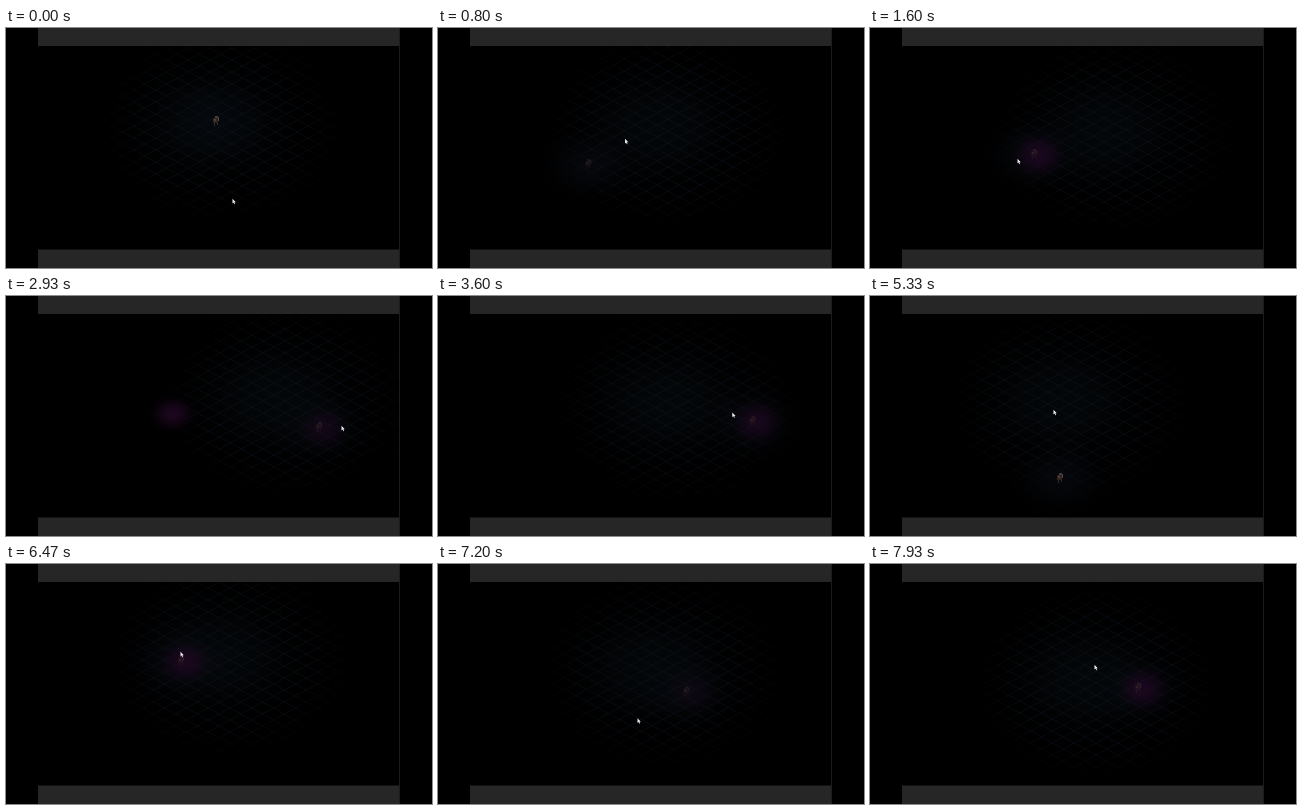
Animation of 426x240 px, one loop 8000 ms. Source, as an HTML page with a canvas:

```html
<!DOCTYPE html>
<html lang="en">
<head>
<meta charset="utf-8">
<title>Dark grid</title>
<style>
html, body { margin: 0; width: 100%; height: 100%; overflow: hidden; background: #000; }
canvas { display: block; width: 426px; height: 240px; }
</style>
</head>
<body>
<canvas id="stage" width="426" height="240"></canvas>
<script>
const ctx = document.getElementById('stage').getContext('2d');
const LOOP = 8000, STEP = LOOP / 120, FADE = 330, TRAIL = 130;

// Key poses; swing bends the pointer's way to the pose, lead is how early the hero lands.
const poses = [
  { t: 0, pointer: [226, 170], hero: [210, 93], light: [215, 98] },
  { t: 1600, pointer: [147, 130], hero: [164, 126], light: [245, 108], swing: [-60, -40], lead: 130 },
  { t: 2930, pointer: [335, 129], hero: [313, 131], light: [279, 105], swing: [118, -15], lead: 65 },
  { t: 4400, pointer: [240, 53], hero: [228, 126], light: [187, 120], swing: [0, 20], lead: 400 },
  { t: 5330, pointer: [183, 113], hero: [190, 182], light: [200, 108], swing: [0, 110], lead: 400 },
  { t: 6470, pointer: [174, 87], hero: [175, 97], light: [224, 96], swing: [-25, 0], lead: 130 },
  { t: 7930, pointer: [224, 100], hero: [268, 124], light: [226, 119], swing: [65, 60], lead: 130 }
];

const mix = (a, b, p) => a.map((v, i) => v + (b[i] - v) * p);

function segment(t) {
  const i = poses.findIndex(p => p.t > t);
  if (i < 0) return [poses.at(-1), poses.at(-1), 0];
  const a = poses[i - 1], b = poses[i], p = (t - a.t) / (b.t - a.t);
  return [a, b, p * p * (3 - 2 * p)];
}

function pointerAt(t) {
  const [a, b, p] = segment(t);
  const [x, y] = mix(a.pointer, b.pointer, p);
  if (!p) return [x, y];
  return [x + b.swing[0] * Math.sin(2 * Math.PI * p), y + b.swing[1] * Math.sin(Math.PI * p)];
}

function lightAt(t) {
  const [a, b, p] = segment(t);
  return mix(a.light, b.light, p);
}

// The hero chases the pointer twice on the way, then lands at the pose.
const hops = [{ t: -LOOP, at: poses[0].hero }];
poses.slice(1).forEach((pose, i) => {
  const from = poses[i].t, land = pose.t - pose.lead;
  for (const p of [0.3, 0.65]) {
    const t = from + (pose.t - from) * p;
    if (t < land) hops.push({ t, at: pointerAt(t) });
  }
  hops.push({ t: land, at: pose.hero });
});

function ellipse(x, y, rx, ry, rgb, alpha) {
  ctx.save();
  ctx.translate(x, y);
  ctx.scale(rx, ry);
  const g = ctx.createRadialGradient(0, 0, 0, 0, 0, 1);
  for (let p = 0; p <= 1; p += 0.25) {
    g.addColorStop(p, `rgba(${rgb},${alpha * (1 + Math.cos(Math.PI * p)) / 2})`);
  }
  ctx.fillStyle = g;
  ctx.fillRect(-1, -1, 2, 2);
  ctx.restore();
}

function gridLines(x, y, r, alpha) {
  ctx.save();
  ctx.translate(x, y);
  ctx.beginPath();
  for (let c = -180; c <= 180; c += 12) {
    for (const s of [-0.55, 0.55]) {
      ctx.moveTo(-r, c - r * s);
      ctx.lineTo(r, c + r * s);
    }
  }
  ctx.scale(1, 0.8);
  const g = ctx.createRadialGradient(0, 0, 0, 0, 0, r);
  g.addColorStop(0, `rgba(11,17,25,${alpha})`);
  g.addColorStop(0.65, `rgba(10,15,24,${alpha * 0.75})`);
  g.addColorStop(1, 'rgba(8,12,22,0)');
  ctx.strokeStyle = g;
  ctx.lineWidth = 1;
  ctx.stroke();
  ctx.restore();
}

function drawBursts(t) {
  hops.forEach((hop, i) => {
    const age = t - hop.t;
    const wave = span => age > 0 && age < span ? Math.sin(Math.PI * age / span) : 0;
    const [x, y] = hop.at;
    ellipse(x + 4, y + 1, 30, 26, '32,7,35', wave(FADE) * 0.85);
    if (i) ellipse(...hops[i - 1].at, 26, 20, '32,7,35', wave(TRAIL) * 0.9);
  });
}

function drawHero([x, y], fresh) {
  const dot = (color, dx, dy, w, h) => {
    ctx.fillStyle = color;
    ctx.fillRect(dx, dy, w, h);
  };
  ctx.save();
  ctx.translate(x, y);
  ctx.globalAlpha = fresh ? 0.25 : 0.75;
  dot('#55504a', -1, -5, 3, 2);
  dot('#3f2c24', -3, -3, 5, 5);
  dot('#6d4530', -2, -2, 2, 2);
  dot('#62626a', 2, -4, 1, 4);
  dot('#3c3835', -2, 2, 1, 3);
  dot('#3c3835', 1, 2, 1, 2);
  ctx.restore();
}

const arrow = new Path2D('M0.5 0.8V5.4L1.6 4.6 2.4 6.2 3.1 5.9 2.4 4.3H3.8Z');
function drawPointer([x, y]) {
  ctx.save();
  ctx.translate(x, y);
  ctx.fillStyle = '#eee';
  ctx.fill(arrow);
  ctx.restore();
}

function draw(t) {
  const [lx, ly] = lightAt(t);
  const hop = hops.findLast(h => h.t <= t);
  const [hx, hy] = hop.at;
  ctx.fillStyle = '#000';
  ctx.fillRect(0, 0, 426, 240);
  ctx.save();
  ctx.beginPath();
  ctx.rect(32, 18, 361, 204);
  ctx.clip();
  ellipse(lx - 10, ly - 4, 95, 70, '5,10,13', 0.7);
  ellipse(hx, hy, 55, 42, '6,9,14', 0.7);
  gridLines(lx, ly, 128, 0.85);
  drawBursts(t);
  drawHero(hop.at, t - hop.t < FADE);
  ctx.restore();
  ctx.fillStyle = '#262626';
  ctx.fillRect(32, 0, 361, 18);
  ctx.fillRect(32, 221.5, 361, 18.5);
  ctx.fillStyle = '#1c1c1c';
  ctx.fillRect(393, 0, 1, 240);
  drawPointer(pointerAt(t));
}

const begin = performance.now();
function tick() {
  const t = (performance.now() - begin) % LOOP;
  draw(Math.floor((t + 3.4) / STEP) % 120 * STEP);
  requestAnimationFrame(tick);
}
tick();
</script>
</body>
</html>
```
